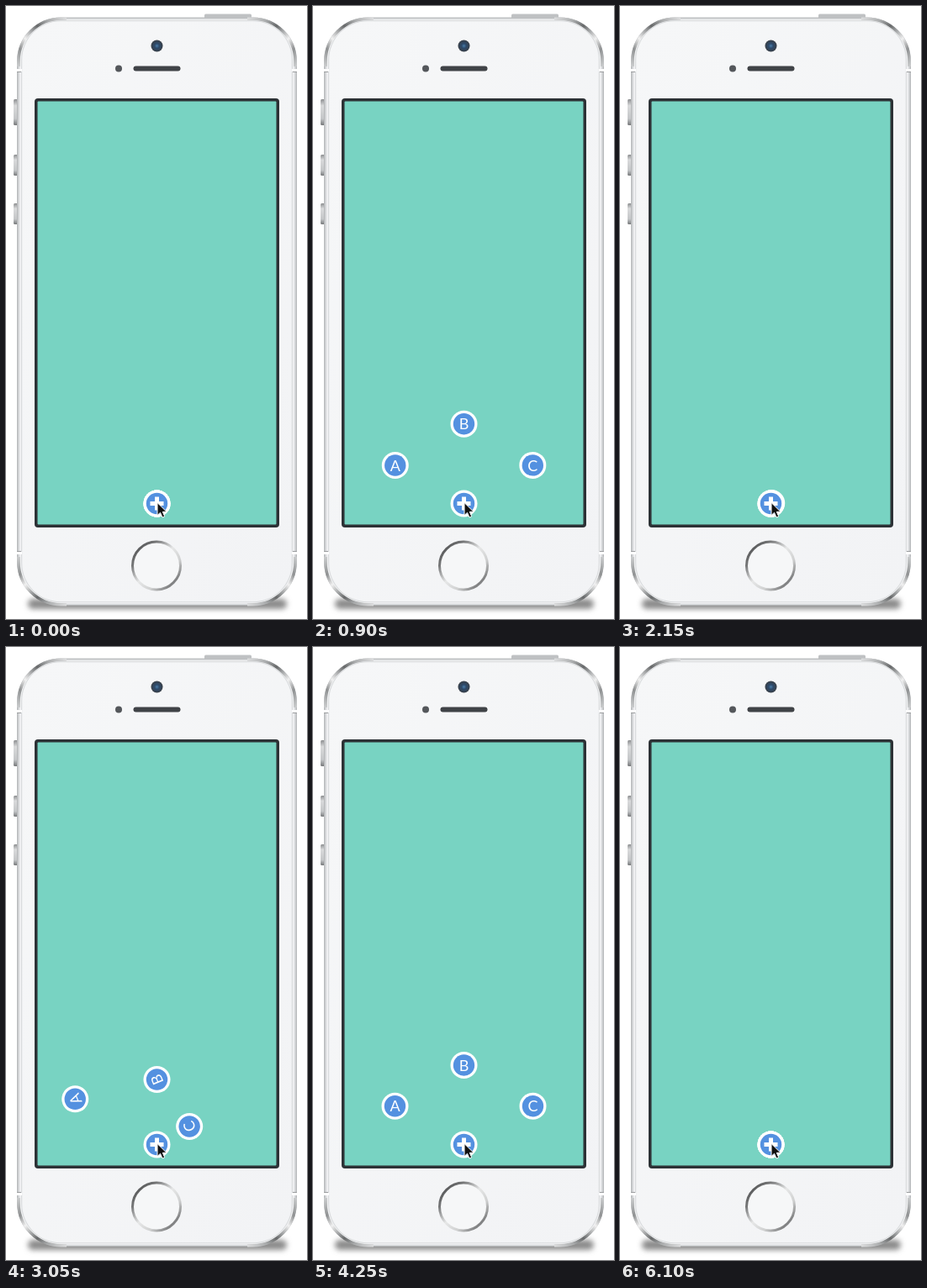
An HTML page that plays this animation: 358x730 px, repeating every 6150 ms.

```html
<!DOCTYPE html>
<html lang="en">
<head>
<meta charset="utf-8">
<title>Spring menu</title>
<style>
  html, body { margin: 0; width: 100%; height: 100%; overflow: hidden; background: #fff; }
  svg { display: block; width: 358px; height: 730px; }
  text { font: 400 18px Lato, "Open Sans", sans-serif; fill: #fff; text-anchor: middle; }
</style>
</head>
<body>
<svg viewBox="0 0 358 730" xmlns="http://www.w3.org/2000/svg">
  <defs>
    <linearGradient id="face" x1="0" y1="0" x2="1" y2="1">
      <stop offset="0" stop-color="#f6f7f8"/>
      <stop offset="1" stop-color="#f2f3f5"/>
    </linearGradient>
    <linearGradient id="knob" x1="0" y1="0" x2="0" y2="1">
      <stop offset="0" stop-color="#8d8f91"/>
      <stop offset=".25" stop-color="#d9dadb"/>
      <stop offset=".75" stop-color="#c4c6c8"/>
      <stop offset="1" stop-color="#77797b"/>
    </linearGradient>
    <linearGradient id="chrome" x1="0" y1="0" x2="1" y2="1">
      <stop offset="0" stop-color="#3f4041"/>
      <stop offset=".25" stop-color="#777879"/>
      <stop offset=".48" stop-color="#e6e7e7"/>
      <stop offset=".68" stop-color="#d0d1d1"/>
      <stop offset=".85" stop-color="#808182"/>
      <stop offset="1" stop-color="#b4b5b6"/>
    </linearGradient>
    <linearGradient id="rim" gradientUnits="userSpaceOnUse" x1="15" y1="72" x2="72" y2="15">
      <stop offset="0" stop-color="#c9cbcc"/>
      <stop offset=".2" stop-color="#8f9192"/>
      <stop offset=".36" stop-color="#f0f0f0"/>
      <stop offset=".5" stop-color="#a5a7a8"/>
      <stop offset=".62" stop-color="#67696a"/>
      <stop offset=".78" stop-color="#a9abac"/>
      <stop offset="1" stop-color="#dcddde"/>
    </linearGradient>
    <radialGradient id="lens">
      <stop offset="0" stop-color="#4a7ba5"/>
      <stop offset=".4" stop-color="#2d4a6b"/>
      <stop offset="1" stop-color="#3a4047"/>
    </radialGradient>
    <filter id="soft" x="-10%" y="-100%" width="120%" height="300%">
      <feGaussianBlur stdDeviation="3"/>
    </filter>
    <clipPath id="screen"><rect x="37.500" y="113.500" width="284" height="504"/></clipPath>
    <g id="disc">
      <circle r="16" fill="#fff"/>
      <circle r="12.700" fill="#5491e0"/>
    </g>
  </defs>

  <rect width="358" height="730" fill="#fff"/>
  <rect x="26" y="706" width="308" height="12" rx="6" fill="#8a8a8a" filter="url(#soft)"/>

  <g fill="url(#knob)">
    <rect x="9" y="111" width="6" height="31" rx="1.500"/>
    <rect x="9" y="177" width="6" height="25" rx="1.500"/>
    <rect x="9" y="235" width="6" height="25" rx="1.500"/>
  </g>
  <rect x="236" y="9.500" width="56" height="6" rx="1.500" fill="#bfc1c3"/>

  <g id="body"></g>
  <g id="edges" fill="none"></g>

  <circle cx="179.500" cy="47.500" r="7" fill="url(#lens)"/>
  <circle cx="134" cy="74.500" r="4" fill="#54575b"/>
  <rect x="151.500" y="71.500" width="56" height="6" rx="3" fill="#404347"/>

  <circle cx="179" cy="666.500" r="28.500" fill="#f6f7f8" stroke="url(#chrome)" stroke-width="3"/>

  <rect x="34" y="110" width="291" height="511" rx="4" fill="#2c3135"/>
  <rect x="37.500" y="113.500" width="284" height="504" rx="1" fill="#78d3c2"/>

  <g clip-path="url(#screen)">
    <g id="items"></g>
    <g transform="translate(179.500 592.500)">
      <use href="#disc"/>
      <path d="M-8 0H8M0-8V8" stroke="#fff" stroke-width="5"/>
    </g>
  </g>
  <path d="M180 591.500V606.500L183.500 603.300L186 609L188.700 607.800L186.300 602.300H191Z"
        fill="#111" stroke="#fff" stroke-width="1" stroke-linejoin="round"/>
</svg>

<script>
const NS = "http://www.w3.org/2000/svg";
const LOOP = 6150, STEP = 50, SPIN = 320;
const HUB = { x: 179.5, y: 592.5 };

const items = [
  { label: "A", dx: -82, dy: -45.7, damping: 0.4, speed: 0.0275 },
  { label: "B", dx: 0, dy: -94.5, damping: 0.5, speed: 0.0193 },
  { label: "C", dx: 82, dy: -45.7, damping: 0.6, speed: 0.013 }
];

const toggles = [
  { at: 375, open: true },
  { at: 1675, open: false },
  { at: 2950, open: true },
  { at: 4660, open: false }
];

function add(parent, name, attrs) {
  const el = document.createElementNS(NS, name);
  for (const key in attrs) el.setAttribute(key, attrs[key]);
  return parent.appendChild(el);
}

// Nested rounded shells from the metal rim to the face.
function buildBody() {
  const body = document.getElementById("body");
  const shells = [[0, "#b9bbbd"], [1.5, "#dcdee0"], [3.5, "#f3f4f5"], [5, "#d9dbdd"], [6.2, "url(#face)"]];
  for (const [inset, fill] of shells) {
    add(body, "rect", {
      x: 13 + inset, y: 13.5 + inset * 0.75, rx: 52 - inset, fill,
      width: 333 - 2 * inset, height: 700.5 - 1.5 * inset
    });
  }
}

// Polished corners and antenna gaps, mirrored four ways.
function buildEdges() {
  const edges = document.getElementById("edges");
  const mirrors = ["", "matrix(-1 0 0 1 359 0)", "matrix(1 0 0 -1 0 728)", "matrix(-1 0 0 -1 359 728)"];
  for (const transform of mirrors) {
    const g = add(edges, "g", { transform });
    add(g, "path", { d: "M15 72V66A50.500 50.500 0 0 1 66 15.200H72", stroke: "url(#rim)", "stroke-width": 3.5 });
    add(g, "path", { d: "M13 76.500H19", stroke: "#fff", "stroke-width": 3 });
    add(g, "path", { d: "M13 78.500H18", stroke: "#9b9d9f", "stroke-width": 1 });
  }
}

function buildItems() {
  const layer = document.getElementById("items");
  for (const item of items) {
    item.node = add(layer, "g", {});
    add(item.node, "use", { href: "#disc" });
    add(item.node, "text", { y: 6.6 }).textContent = item.label;
  }
}

// Step response of an underdamped spring.
function spring(t, damping, speed) {
  const x = t * speed, w = Math.sqrt(1 - damping * damping);
  return 1 - Math.exp(-damping * x) * (Math.cos(w * x) + damping / w * Math.sin(w * x));
}

function draw(t) {
  const last = toggles.filter(e => e.at <= t).pop();
  const age = last ? t - last.at : 0;
  const turn = last ? 360 * Math.max(0, 1 - age / SPIN) : 0;
  for (const { dx, dy, damping, speed, node } of items) {
    let p = 0;
    if (last) p = last.open ? spring(age, damping, speed) : 1 - spring(age, damping, speed * 1.25);
    const x = HUB.x + dx * p, y = HUB.y + dy * p;
    node.setAttribute("transform", `translate(${x.toFixed(2)} ${y.toFixed(2)}) rotate(${turn.toFixed(1)})`);
  }
}

buildBody();
buildEdges();
buildItems();
draw(0);

const start = performance.now();
function tick(now) {
  const t = Math.max(0, now - start) % LOOP;
  draw(Math.floor(t / STEP) * STEP);
  requestAnimationFrame(tick);
}
requestAnimationFrame(tick);
</script>
</body>
</html>
```
